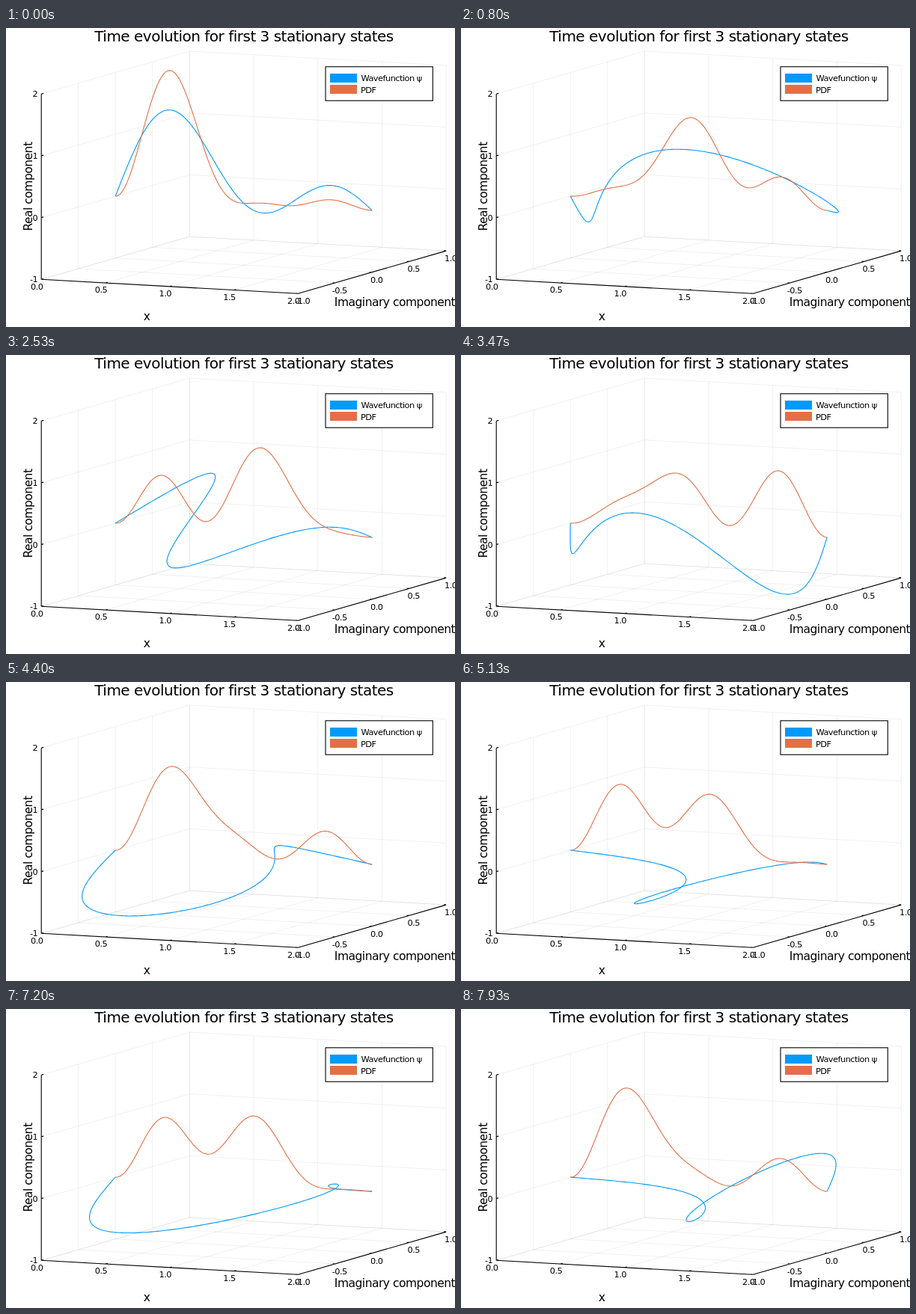
Write an HTML page that moves like this. It is 600x400 px and loops after 8 s.

```html
<!DOCTYPE html>
<html lang="en">
<head>
<meta charset="utf-8">
<title>Stationary states</title>
<style>
  html, body { margin: 0; width: 100%; height: 100%; overflow: hidden; background: #fff; }
  svg { display: block; width: 600px; height: 400px; font-family: "DejaVu Sans", sans-serif; }
  text { text-anchor: middle; font-size: 11.3px; letter-spacing: -.5px; font-variant-ligatures: none; }
  .title { font-size: 20px; }
  .guide { font-size: 15.5px; }
  .end { text-anchor: end; }
  .start { text-anchor: start; }
  path { fill: none; stroke-linejoin: round; }
  #grid { stroke: #000; stroke-opacity: .1; stroke-width: .6; }
  #axes { stroke: #000; stroke-width: 1.1; }
  #psi { stroke: #009afa; stroke-width: 1.1; }
  #pdf { stroke: #e36f47; stroke-width: 1.1; }
</style>
</head>
<body>
<svg viewBox="0 0 600 400">
  <path id="grid"/>
  <path id="axes"/>
  <g id="labels"></g>
  <text class="title" x="318" y="18">Time evolution for first 3 stationary states</text>
  <text class="guide" x="188" y="391">x</text>
  <text class="guide" x="519.5" y="372">Imaginary component</text>
  <text class="guide" transform="translate(34.5 212) rotate(-90)">Real component</text>
  <path id="psi"/>
  <path id="pdf"/>
  <rect x="427" y="51.8" width="143.3" height="45.4" fill="#fff" stroke="#000" stroke-width="1.1"/>
  <rect x="433" y="61" width="36" height="12" fill="#009afa"/>
  <rect x="433" y="76" width="36" height="12" fill="#e36f47"/>
  <text class="start" x="474.5" y="71">Wavefunction ψ</text>
  <text class="start" x="474" y="86.5">PDF</text>
</svg>
<script>
const FRAMES = 120, LOOP = 8000, PHASE_STEP = 0.03386, SAMPLES = 240;
const $ = id => document.getElementById(id);

// Orthographic view of (position, imaginary, real).
const project = (x, im, re) => [
  146.2 + 171.5 * x + 99 * im,
  225 + 9.5 * x - 28.6 * im - 82.7 * re
];
const line = points => "M" + points.map(p => p.map(v => v.toFixed(2)).join()).join("L");
const polyline = (...points) => line(points.map(p => project(...p)));

function label(text, [x, y], className = "") {
  $("labels").insertAdjacentHTML("beforeend",
    `<text class="${className}" x="${x}" y="${y + 4}">${text}</text>`);
}

function tick([x, y], dx, dy) {
  return line([[x, y], [x + dx, y + dy]]);
}

function drawAxes() {
  let grid = "", axes = polyline([0, -1, 2], [0, -1, -1], [2, -1, -1], [2, 1, -1]);
  for (let x = 0; x <= 2; x += 0.5) {
    grid += polyline([x, -1, -1], [x, 1, -1], [x, 1, 2]);
    const p = project(x, -1, -1);
    axes += tick(p, 2.9, -0.8);
    label(x.toFixed(1), [p[0] - 6, p[1] + 9.3]);
  }
  for (let im = -1; im <= 1; im += 0.5) {
    grid += polyline([2, im, -1], [0, im, -1], [0, im, 2]);
    const p = project(2, im, -1);
    axes += tick(p, -3, -0.2);
    label(im.toFixed(1), [p[0] + 6, p[1] + 9.8]);
  }
  for (let re = -1; re <= 2; re++) {
    grid += polyline([0, -1, re], [0, 1, re], [2, 1, re]);
    const p = project(0, -1, re);
    axes += tick(p, 2.9, -0.8);
    label(re, [p[0] - 5, p[1]], "end");
  }
  $("grid").setAttribute("d", grid);
  $("axes").setAttribute("d", axes);
}

// Equal mix of the first three well states; energy grows with n squared.
function wave(x, phase) {
  let re = 0, im = 0;
  for (let n = 1; n <= 3; n++) {
    const amplitude = Math.sin(n * Math.PI * x / 2) / Math.sqrt(3);
    re += amplitude * Math.cos(n * n * phase);
    im -= amplitude * Math.sin(n * n * phase);
  }
  return [im, re];
}

function draw(now) {
  const step = Math.min(FRAMES - 1, Math.floor((now % LOOP + 3.4) * FRAMES / LOOP));
  const psi = [], pdf = [];
  for (let i = 0; i <= SAMPLES; i++) {
    const x = 2 * i / SAMPLES;
    const [im, re] = wave(x, step * PHASE_STEP);
    psi.push(project(x, im, re));
    pdf.push(project(x, 0, im * im + re * re));
  }
  $("psi").setAttribute("d", line(psi));
  $("pdf").setAttribute("d", line(pdf));
}

function animate() {
  draw(performance.now());
  requestAnimationFrame(animate);
}

drawAxes();
animate();
</script>
</body>
</html>
```
